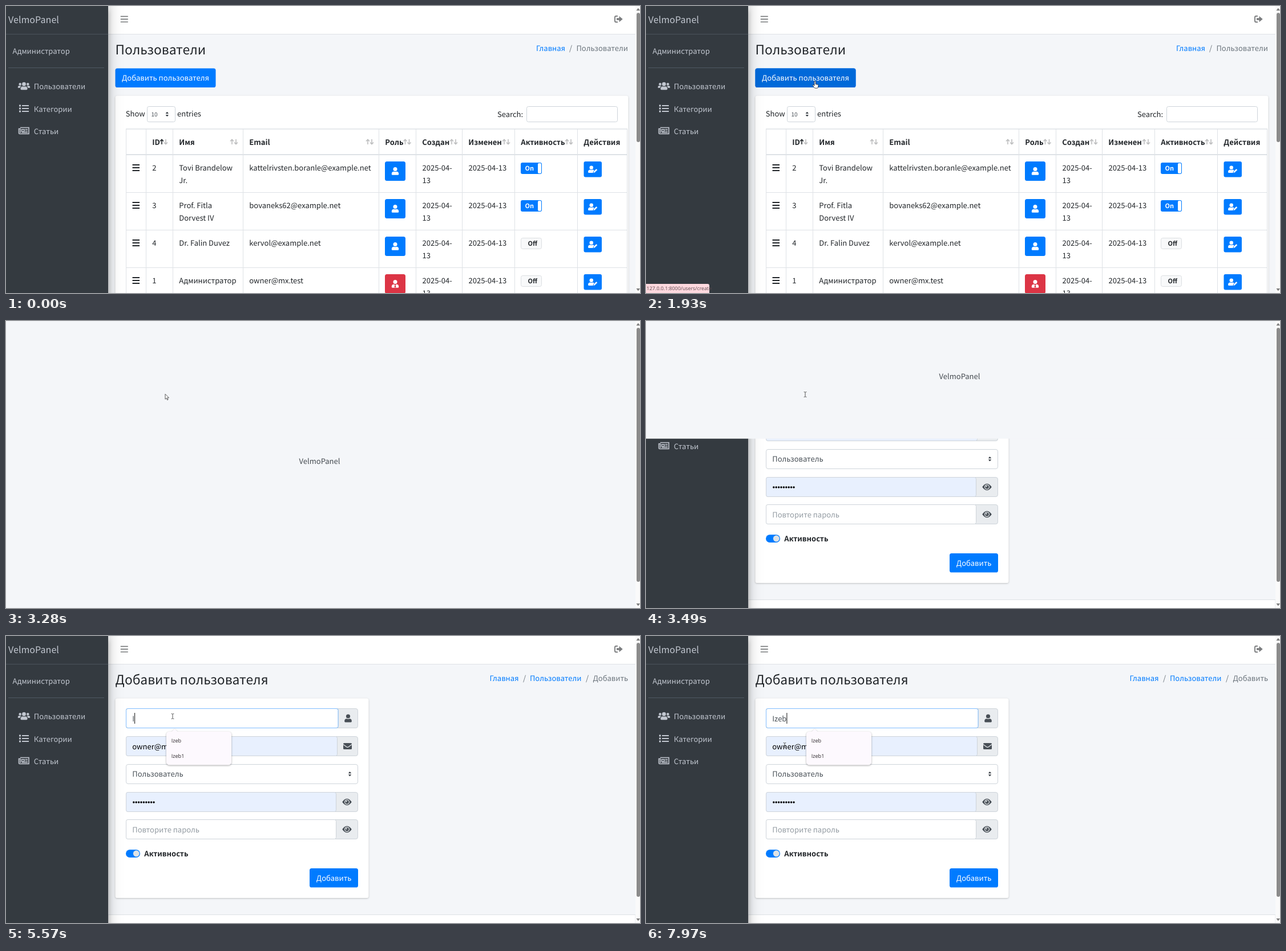
Animation of 1111 by 504 pixels, one loop 8 s. Source, as an HTML page:

```html
<!DOCTYPE html>
<html lang="ru">
<head>
<meta charset="utf-8">
<title>Admin panel</title>
<style>
  html, body { margin: 0; width: 100%; height: 100%; overflow: hidden; background: #f4f6f9; }
  svg { display: block; }
  text { font: 13px "Noto Sans CJK SC", "Noto Sans CJK JP", "Noto Sans CJK", "Noto Sans", sans-serif;
         fill: #212529; text-rendering: geometricPrecision; white-space: pre; }
  .bold { font-weight: 700; }
  .h1 { font-size: 22.8px; }
  .brand { font-size: 16.1px; font-weight: 300; }
  .light { fill: #c2c7d0; }
  .link { fill: #007bff; }
  .muted { fill: #6c757d; }
  .hint { fill: #939ba2; }
  .field { fill: #495057; }
  .white { fill: #fff; }
  .small { font-size: 10px; fill: #495057; }
  .toggle { font-size: 11px; font-weight: 700; }
  .native { font: 9.1px "Open Sans", sans-serif; fill: #2a2528; }
  .status { font: 8.8px "Open Sans", sans-serif; fill: #5c4a50; }
  .card { filter: drop-shadow(0 1px 1.5px rgba(0,0,0,.22)); }
  .popup { filter: drop-shadow(0 1px 1.5px rgba(0,0,0,.35)); }
  .shade1 { filter: drop-shadow(0 12px 12.5px rgba(0,0,0,.25)); }
  .shade2 { filter: drop-shadow(0 9px 4.5px rgba(0,0,0,.22)); }
</style>
</head>
<body>
<svg id="stage" width="1111" height="504" viewBox="0 0 1111 504"></svg>
<script>
const BLUE = '#007bff', LINE = '#dee2e6', EDGE = '#ced4da', INK = '#212529';
const BRAND = 'VelmoPanel', EMAIL = 'owner@mx.test', NAME = 'Izeb';

const text = (x, y, s, cls = '', attrs = '') => `<text x="${x}" y="${y}" class="${cls}" ${attrs}>${s}</text>`;
const rect = (x, y, w, h, fill, stroke = 'none', r = 0, attrs = '') =>
  `<rect x="${x}" y="${y}" width="${w}" height="${h}" rx="${r}" fill="${fill}" stroke="${stroke}" ${attrs}/>`;
const path = (d, fill, stroke = 'none', width = 1, attrs = '') =>
  `<path d="${d}" fill="${fill}" stroke="${stroke}" stroke-width="${width}" ${attrs}/>`;
const at = (x, y, body, scale = 1) => `<g transform="translate(${x} ${y}) scale(${scale})">${body}</g>`;
const group = (id, body) => `<g id="${id}">${body}</g>`;

// Icons, centred on the origin
const person = color => `<circle cy="-3.5" r="3.6" fill="${color}"/>` +
  path('M-6.3 5.6v-.9a4 4 0 0 1 4-4q2.3 1 4.6 0a4 4 0 0 1 4 4v.9q0 1.4-1.4 1.4h-9.8q-1.4 0-1.4-1.4z', color);
const manager = person('#fff') + path('M-1.2 1h2.4l-.6 1.6.9 3-1.5 1.4-1.5-1.4.9-3z', '#dc3545');
const editor = at(-2.2, 0, person('#fff'), .9) + path('M1 6.5l.4-2.6 5-5 2.2 2.2-5 5z', '#fff', BLUE, .9);
const crowd = at(-6.8, -.5, person('#c2c7d0'), .62) + at(6.8, -.5, person('#c2c7d0'), .62) +
  at(0, .5, path('M-7 7.5v-4a4 4 0 0 1 4-4h6a4 4 0 0 1 4 4v4z', '#343a40') + person('#c2c7d0'), .95);
const bars = (w, gap, thick, color) => path([-gap, 0, gap].map(y => `M${-w / 2} ${y}h${w}`).join(''), 'none', color, thick);
const list = at(2.5, 0, bars(12, 5, 2, '#c2c7d0')) + at(-7, 0, bars(3, 5, 3, '#c2c7d0'));
const paper = path('M-6.5-5.5h15v11h-16q-1.5 0-1.5-1.5v-7.5h2.5v7.5', 'none', '#c2c7d0', 1.6) +
  path('M-4-2.2h4.5v3.4h-4.500zM2-2.2h4.500M2 .6h4.500M-4 3.2h10.500', 'none', '#c2c7d0', 1.4);
const exit = path('M-1.500-5.200h-3q-2 0-2 2v6.400q0 2 2 2h3', 'none', '#7b7d7f', 1.900) +
  path('M-3.500-1.800h4.500v-3.400l6.200 5.200-6.200 5.200v-3.400h-4.500z', '#7b7d7f');
const envelope = rect(-7.5, -5.5, 15, 11, '#495057', 'none', 1.5) +
  path('M-7.500-3l5.800 4.300q1.700 1.100 3.400 0l5.800-4.300', 'none', '#e9ecef', 1.1);
const eye = path('M-8.300 0Q-4.500-5.800 0-5.800T8.300 0Q4.500 5.800 0 5.800T-8.300 0z', '#495057') +
  '<circle r="3.9" fill="#495057" stroke="#e9ecef" stroke-width="1.2"/><circle cx="-1.1" cy="-1.1" r="1.2" fill="#e9ecef"/>';
const spinner = path('M-2.700-1h5.400L0-4.300zM-2.700 1h5.400L0 4.300z', '#343a40');
const upArrow = (x, o) => path(`M${x} 243v-8.500m-3 3l3-3.200 3 3.200`, 'none', INK, 1.6, `opacity="${o}"`);
const downArrow = x => path(`M${x} 234v8.500m-3-3l3 3.200 3-3.200`, 'none', INK, 1.6, 'opacity=".3"');

function listPage() {
  const columns = [210.5, 245.5, 292.5, 415.5, 653.5, 718.5, 799.5, 891.5, 1001.5, 1088.5];
  const heads = ['', 'ID', 'Имя', 'Email', 'Роль', 'Создан', 'Изменен', 'Активность', 'Действия'];
  const sorters = [0, 273, 396, 634, 699.5, 781, 873, 983];
  const users = [
    [2, 'Tovi Brandelow', 'Jr.', 'kattelrivsten.boranle@example.net', true],
    [3, 'Prof. Fitla', 'Dorvest IV', 'bovaneks62@example.net', true],
    [4, 'Dr. Falin Duvez', '', 'kervol@example.net', false],
    [1, 'Администратор', '', EMAIL, false]];
  const row = ([id, name, rest, mail, on], i) => {
    const y = 261.5 + 66 * i, a = y + 27.5, b = y + 49.3;
    const admin = id === 1;
    return path(`M210 ${y + 66}h879`, 'none', LINE) + at(227.8, y + 22.5, bars(12.5, 5, 1.9, INK)) +
      text(256.3, a, id) + text(303.3, a, name) + text(303.3, b, rest) + text(426.3, a, mail) +
      rect(664, y + 11.5, 36, 34, admin ? '#dc3545' : BLUE, 'none', 3.5) +
      at(682, y + 28.5, admin ? manager : person('#fff'), .98) +
      text(729.5, a, '2025-04-') + text(729.5, b, '13') + text(810.5, a, '2025-04-13') +
      (on ? rect(902, y + 13.5, 37, 20, BLUE, 'none', 3) + rect(932, y + 14.5, 6, 18, '#fff', 'none', 2) +
            text(909.5, y + 27.5, 'On', 'toggle white')
          : rect(902.5, y + 14, 36, 19, '#f8f9fa', '#dcdfe2', 3) + text(914.5, y + 27.5, 'Off', 'toggle')) +
      rect(1012.5, y + 11.5, 31.5, 27.5, BLUE, 'none', 3) + at(1028, y + 25.3, editor);
  };
  return text(191.5, 84.5, 'Пользователи', 'h1') +
    text(929, 79, 'Главная', 'link') + text(987, 79, '/', 'muted') + text(999.5, 79, 'Пользователи', 'muted') +
    rect(191.5, 109.5, 176, 33.5, BLUE, 'none', 3.6) +
    rect(191.5, 109.5, 176, 33.5, '#0069d9', 'none', 3.6, 'id="hover"') +
    text(203, 131, 'Добавить пользователя', 'white') +
    rect(191.5, 157.5, 899, 400, '#fff', 'none', 3.6, 'class="card"') +
    text(209.800, 194, 'Show') + rect(247.5, 176.5, 49, 27, '#fff', EDGE, 3) + text(254.5, 193.6, '10', 'small') +
    at(282.3, 190, spinner) + text(300, 194, 'entries') +
    text(861, 195, 'Search:') + rect(912.5, 176.5, 159, 27, '#fff', EDGE, 3) +
    path('M210 216h879', 'none', LINE, 1.6) + path('M210 261h879', 'none', LINE, 1.8) +
    columns.map(x => path(`M${x} 216v300`, 'none', LINE)).join('') +
    heads.map((s, i) => text(columns[i] + 10.8, 243.5, s, 'bold')).join('') +
    sorters.map((x, i) => i ? upArrow(x, i === 1 ? 1 : .3) + downArrow(x + 7) : '').join('') +
    users.map(row).join('');
}

function formPage() {
  const rows = [127.5, 176.5, 225.5, 274.5, 322.5];
  const input = (i, split, fill, icon) => rect(210.5, rows[i], 406, 34, split ? '#e9ecef' : fill, EDGE, 3.6) +
    (split ? rect(210.5, rows[i], split - 210, 34, fill, EDGE, 3) + at((split + 617) / 2, rows[i] + 17, icon) : '');
  return text(191.5, 84.5, 'Добавить пользователя', 'h1') +
    text(847.5, 79, 'Главная', 'link') + text(906, 79, '/', 'muted') + text(918, 79, 'Пользователи', 'link') +
    text(1016, 79, '/', 'muted') + text(1028.5, 79, 'Добавить', 'muted') +
    rect(191.5, 109.5, 444, 350.5, '#fff', 'none', 3.6, 'class="card"') +
    input(0, 582, '#fff', person('#495057')) + input(1, 580, '#e8f0fe', envelope) + input(2, 0, '#fff') +
    input(3, 578, '#e8f0fe', eye) + input(4, 578, '#fff', eye) +
    rect(210.5, 127.5, 371.5, 34, 'none', '#80bdff', 3, 'id="focus"') +
    text(221.3, 150, 'Имя', 'hint', 'id="hint"') + text(221.3, 150, '', 'field', 'id="typed"') +
    text(221.3, 198.7, EMAIL, '', 'style="fill:#000"') + text(221.3, 247, 'Пользователь', 'field') +
    at(602.5, 242.3, spinner) +
    path('M223.800 292h36', 'none', '#000', 3.5, 'stroke-linecap="round" stroke-dasharray="0 4.4"') +
    text(221.3, 345, 'Повторите пароль', 'hint') +
    rect(210, 375.3, 25, 13.6, BLUE, 'none', 6.8) + '<circle cx="228.300" cy="382.100" r="5.500" fill="#dee2e6"/>' +
    text(242.3, 387, 'Активность', 'bold') +
    rect(532, 408, 85, 33.5, BLUE, 'none', 3.6) + text(543.8, 430, 'Добавить', 'white') +
    rect(179, 489.5, 924, 20, '#fff', LINE);
}

const frame =
  rect(179, 0, 924, 49.5, '#fff') + path('M179 49.500h924', 'none', LINE) +
  at(207.3, 23.2, bars(13, 4.8, 1.7, '#7b7d7f')) + at(1073.5, 23, exit) +
  rect(0, -30, 179, 560, '#343a40', 'none', 0, 'class="shade1"') +
  rect(0, 0, 179, 530, '#343a40', 'none', 0, 'class="shade2"') +
  text(4, 30, BRAND, 'brand light') + path('M0 49.500h179', 'none', '#4b545c') +
  text(11.5, 84, 'Администратор', 'light') + path('M4 108.500h168', 'none', '#4f5962') +
  at(31.5, 140, crowd) + text(48.8, 146, 'Пользователи', 'light') +
  at(31.5, 180, list) + text(48.8, 186, 'Категории', 'light') +
  at(31.5, 219, paper) + text(48.8, 224.8, 'Статьи', 'light');

const scrollbar = rect(1103, 0, 8, 504, '#fafafa') + rect(1105, 12, 6, 227, '#8b8b8b', 'none', 3, 'id="thumb"') +
  path('M1104.500 8h6.500l-3.200-4.500zM1104.500 496h6.500l-3.200 4.500z', '#7d7d7d');

const popup = '<g class="popup">' + rect(281, 168, 114, 58.5, '#fdf9fe', 'none', 5, 'id="menu"') +
  path('M290 168.500l5.500-5.500 5.500 5.500z', '#fdf9fe') + '</g>' +
  [NAME, NAME + '1', 'test', 'test1', 'user', 'user2']
    .map((s, i) => text(289.7, 187.3 + 26.5 * i, s, 'native', i > 1 ? 'data-extra' : '')).join('');

const pointers =
  group('arrow', path('M0 0v9l2.100-1.900 1.500 3.300 1.500-.7-1.500-3.200h2.900z', '#fff', '#333', .8)) +
  group('hand', path('M-1.100 1q0-1 1.100-1t1.100 1v4.500l3.800.9q1.200.3 1 1.500l-.6 3.200q-.4 1.500-1.600 1.500h-3.200q-1 0-1.600-.8l-2.800-3.800q-.5-.9.3-1.200.7-.2 1.400.5l1.100.9z', '#fff', '#222', .8)) +
  group('beam', '<circle id="click" r="9" fill="#fdf24a"/>' +
    path('M-2.300-4.500q2.300 0 2.300 1v7q0 1-2.300 1M2.300-4.500q-2.300 0-2.300 1M2.300 4.500q-2.300 0-2.300-1', 'none', '#444', .9));

document.getElementById('stage').innerHTML =
  rect(0, 0, 1111, 504, '#f4f6f9') + group('list', listPage()) + group('form', formPage()) + frame +
  group('loader', rect(0, 0, 1103, 504, '#f4f6f9', 'none', 0, 'id="curtain"') +
    text(549.5, 0, BRAND, '', 'id="logo" text-anchor="middle" style="fill:#444a50"')) +
  scrollbar +
  group('status', path('M0 488h108q3 0 3 3v13h-111z', '#ffd9df') + text(1, 499.3, '127.0.0.1:8000/users/create', 'status')) +
  group('popup', popup) + rect(0, 135, 1, 19, '#111', 'none', 0, 'id="caret"') + group('cursor', pointers);

const $ = id => document.getElementById(id);
const show = (id, on) => $(id).setAttribute('display', on ? 'inline' : 'none');
const set = (id, name, value) => $(id).setAttribute(name, value);
const clamp = v => Math.max(0, Math.min(1, v));

// Pointer route: time, x, y
const route = [[210, 1048, 464], [340, 857, 328], [480, 857, 328], [1280, 390, 160], [1340, 345, 152],
  [1480, 335, 140], [2130, 279, 128], [3210, 279, 128], [3430, 279, 129], [3700, 279, 129], [3910, 291.5, 140],
  [4180, 292, 141], [7290, 292, 141], [7430, 289, 144], [7630, 289, 144], [7970, 243, 192]];
const keys = [5570, 6360, 6550, 6760];
const PAGE = 3210, SHRINK = 3373, READY = 3550, CLICK = 4050, BLINK = 520;

function pointerAt(t) {
  const next = route.findIndex(p => p[0] > t);
  if (next < 1) return next ? route[route.length - 1].slice(1) : route[0].slice(1);
  const [t0, x0, y0] = route[next - 1], [t1, x1, y1] = route[next];
  const k = (t - t0) / (t1 - t0);
  return [x0 + (x1 - x0) * k, y0 + (y1 - y0) * k];
}

function draw(now) {
  const t = now % 8000;
  show('list', t < PAGE);
  show('form', t >= PAGE);
  set('hover', 'opacity', clamp((t - 1450) / 150));
  show('status', t >= 1600 && t < PAGE);
  set('thumb', 'height', t < PAGE ? 227 : 446);

  const height = 504 - 2.52 * Math.max(0, t - SHRINK);
  show('loader', t >= PAGE && t < READY);
  set('curtain', 'height', Math.max(0, height));
  set('logo', 'y', height / 2 - 1.5);

  const typed = keys.filter(k => t >= k).length;
  $('typed').textContent = NAME.slice(0, typed);
  show('hint', !typed);
  set('focus', 'opacity', clamp((t - CLICK) / 130));
  show('popup', t >= CLICK + 60);
  set('menu', 'height', typed ? 58.5 : 164.5);
  document.querySelectorAll('[data-extra]').forEach(e => e.setAttribute('display', typed ? 'none' : 'inline'));

  const lastInput = typed ? keys[typed - 1] : CLICK;
  show('caret', t >= CLICK && Math.floor((t - lastInput) / BLINK) % 2 === 0);
  set('caret', 'x', 221.3 + (typed ? $('typed').getComputedTextLength() : 0));

  show('cursor', t >= 210);
  set('cursor', 'transform', `translate(${pointerAt(t)})`);
  show('hand', t >= 1450 && t < PAGE);
  show('beam', t >= 3430);
  show('arrow', t < 1450 || (t >= PAGE && t < 3430));
  show('click', t >= CLICK && t < 4180);
}

const start = performance.now();
function tick() {
  draw(performance.now() - start);
  requestAnimationFrame(tick);
}
tick();
</script>
</body>
</html>
```
